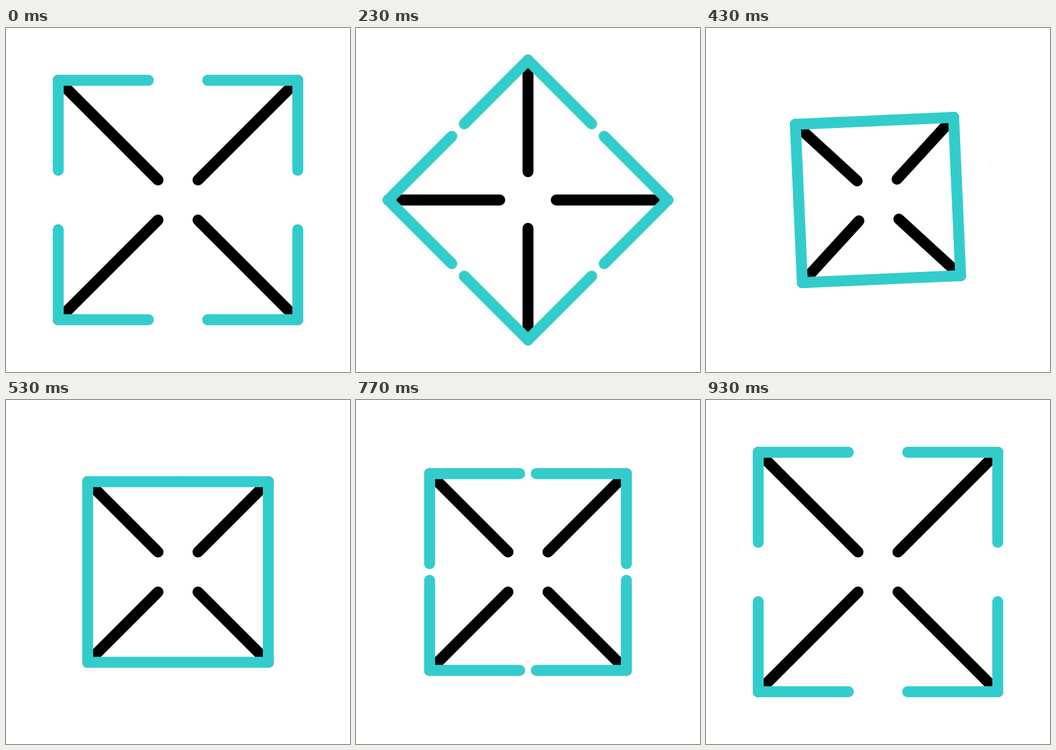
Recreate the animation shown at these times as an HTML page. Size 640x640 px, loop 2 s.

```html
<!DOCTYPE html>
<html lang="en">
<head>
<meta charset="utf-8">
<title>Expand arrows</title>
<style>
  html, body { margin: 0; width: 100%; height: 100%; overflow: hidden; background: #fff; }
  svg { display: block; width: 100vw; height: 100vh; }
  path { fill: none; stroke-width: 20.4; stroke-linecap: round; stroke-linejoin: round; }
</style>
</head>
<body>
<svg viewBox="0 0 640 640">
  <g id="icon">
    <path id="shafts" stroke="#000"/>
    <path id="heads" stroke="#33cccc"/>
  </g>
</svg>
<script>
  const LOOP = 2000;
  const ARM = 167.6;    // length of each arrowhead side
  const INNER = 37.2;   // inner shaft end, measured from the centre
  const CORNERS = [[-1, -1], [1, -1], [1, 1], [-1, 1]];

  // [tick, half size, rotation], with 30 ticks per second
  const KEYS = [
    [0, 222.8, 0],
    [14, 145.2, 90],
    [20, 222.8, 90],
    [24, 173.2, 90],
    [28, 222.8, 90]
  ];

  const icon = document.getElementById('icon');
  const shafts = document.getElementById('shafts');
  const heads = document.getElementById('heads');

  // cubic-bezier(.2, 0, .8, 1), solved by bisection
  function ease(x) {
    let lo = 0, hi = 1;
    for (let i = 0; i < 30; i++) {
      const s = (lo + hi) / 2, r = 1 - s;
      if (0.6 * r * r * s + 2.4 * r * s * s + s * s * s < x) lo = s;
      else hi = s;
    }
    return lo * lo * (3 - 2 * lo);
  }

  function pose(tick) {
    const i = KEYS.findIndex(key => key[0] > tick);
    if (i < 0) return KEYS[KEYS.length - 1].slice(1);
    const [t0, size0, turn0] = KEYS[i - 1];
    const [t1, size1, turn1] = KEYS[i];
    const e = ease((tick - t0) / (t1 - t0));
    return [size0 + (size1 - size0) * e, turn0 + (turn1 - turn0) * e];
  }

  function draw(now) {
    const t = now % LOOP;
    // ticks fall on whole hundredths of a second
    const tick = Math.floor((Math.floor(t / 10) + 0.5) * 0.3);
    const [size, turn] = pose(tick);
    const end = size - ARM;
    icon.setAttribute('transform', `translate(320 320) rotate(${turn})`);
    shafts.setAttribute('d', CORNERS.map(([x, y]) =>
      `M${x * INNER} ${y * INNER}L${x * size} ${y * size}`).join(''));
    heads.setAttribute('d', CORNERS.map(([x, y]) =>
      `M${x * end} ${y * size}H${x * size}V${y * end}`).join(''));
  }

  let start;
  function loop(now) {
    if (start === undefined) start = now;
    draw(Math.max(0, now - start));
    requestAnimationFrame(loop);
  }
  draw(0);
  requestAnimationFrame(loop);
</script>
</body>
</html>
```
